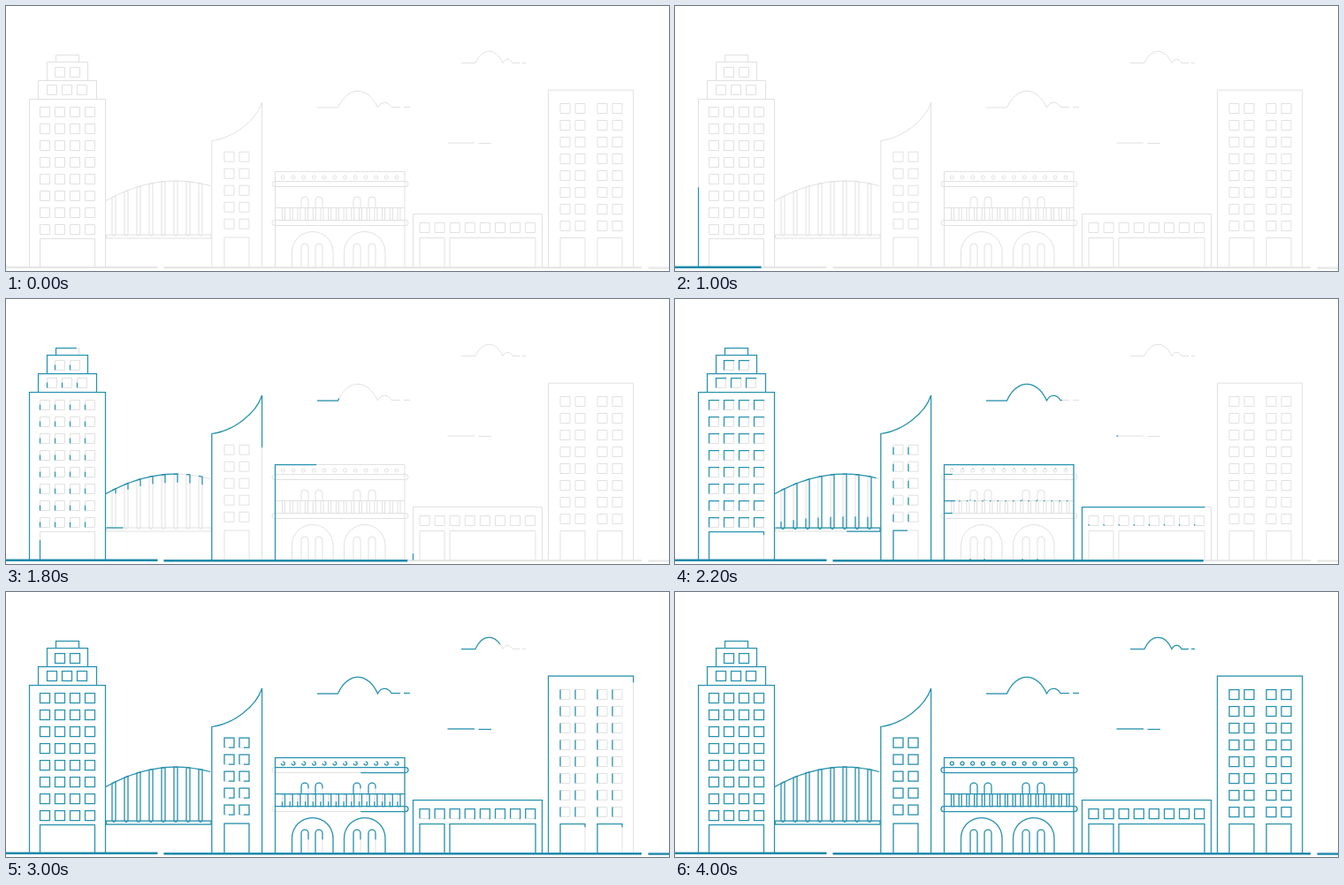
These frames come from a looping animation (750x300 px, 4.05 s). An HTML page:

```html
<!DOCTYPE html>
<html lang="en">
<head>
<meta charset="utf-8">
<title>Skyline</title>
<style>
  html, body { margin: 0; width: 100%; height: 100%; overflow: hidden; background: #fff; }
  svg { display: block; width: 750px; height: 300px; fill: none; }
  #base { stroke: #e1e1e1; }
  #ink { stroke: #2793b0; stroke-width: 1.25; }
  #base .ground { stroke: #e6e6e6; stroke-width: 2.2; }
  #ink .ground { stroke: #1f8aaa; stroke-width: 2.4; }
</style>
</head>
<body>
<svg viewBox="0 0 750 300"><g id="base"></g><g id="ink"></g></svg>
<script>
const LOOP = 4050, STEP = 50, FLOOR = 295.5;
const base = document.getElementById('base');
const ink = document.getElementById('ink');
const strokes = [];

const linear = u => u;
const easeIn = u => u ** 1.75;
const easeOut = u => 1 - (1 - u) ** 1.45;

function addPath(parent, d, cls) {
  const el = document.createElementNS('http://www.w3.org/2000/svg', 'path');
  el.setAttribute('d', d);
  el.setAttribute('class', cls);
  el.setAttribute('pathLength', 100);
  parent.append(el);
  return el;
}

// A pale path that is inked along its length between two times.
function draw(d, start, end, ease = linear, cls = '') {
  addPath(base, d, cls);
  strokes.push({ el: addPath(ink, d, cls), start, end, ease });
}

const range = (n, from, gap) => Array.from({ length: n }, (_, i) => from + i * gap);
const gate = (x, y, w, bottom = FLOOR) => `M${x} ${bottom}V${y}h${w}V${bottom}`;
const pane = (x, y) => `M${x} ${y + 11}v-11h11v11z`;
const arch = (x, top, w, bottom) =>
  `M${x} ${bottom}V${top + w / 2}a${w / 2} ${w / 2} 0 0 1 ${w} 0V${bottom}`;
// A puff of cloud, continuing from its left foot.
const puff = (x, y, w, h) =>
  `C${x + w * 0.11} ${y - h * 0.58} ${x + w * 0.29} ${y - h} ${x + w / 2} ${y - h}` +
  `S${x + w * 0.89} ${y - h * 0.58} ${x + w} ${y}`;

function panes(xs, ys, start, end) {
  for (const y of ys) for (const x of xs) draw(pane(x, y), start, end);
}

// Stepped tower
draw(gate(26.5, 105.5, 86), 550, 1700, easeIn);
draw(gate(36.5, 84.5, 66, 105), 1400, 1640);
draw(gate(46.5, 63.5, 46, 84), 1590, 1780);
draw(gate(56.5, 55.5, 26, 63), 1710, 1830);
panes(range(4, 38.5, 17), range(8, 114.5, 19), 1660, 2700);
panes(range(3, 46.5, 17), [89.5], 1660, 2700);
panes(range(2, 55.5, 17), [69.5], 1660, 2700);
draw(gate(38.5, 263.5, 62), 1680, 2350);

// Bridge
const bridgeY = x => 198 + 0.0036 * (x - 192) ** 2;
draw('M113 220.5Q172 186.9 231 203.5', 1150, 2300, easeOut);
draw('M113.5 259H232V263H113.5z', 1746, 2440);
for (const x of range(8, 120, 14)) {
  draw(`M${x} ${bridgeY(x)}L${x + 4} ${bridgeY(x + 4)}V259q-2 3 -4 0z`, 1720, 2480);
}

// Curved tower
draw(`M232.8 ${FLOOR}V152.5C256 150 283 130 289.6 109V${FLOOR}`, 1300, 2030);
panes([247, 264], range(5, 165.2, 19), 1980, 3130);
draw(gate(247, 262, 28), 1950, 2430);

// Arcade
draw(gate(304.5, 187.5, 146.5), 1510, 2190);
for (const y of [198.5, 242.5]) {
  draw(`M304 ${y}H452a3 3 0 0 1 0 6H304a3 3 0 0 1 0 -6z`, 2160, 3430);
}
for (const x of range(12, 313.3, 11.7)) {
  draw(`M${x} 192a2 2 0 0 1 0 4a2 2 0 0 1 0 -4z`, 2150, 3300);
}
draw('M304.5 228.5H451', 2140, 2850);
for (const x of range(16, 312.5, 8.7)) draw(`M${x} 228.5h3v14h-3z`, 2150, 3300);
for (const x of [334, 350, 393, 410]) {
  draw(arch(x, 216, 8, 228), 2170, 3200);
  draw(arch(x, 269, 8, FLOOR), 2170, 3300);
}
draw(arch(323.5, 255.5, 46.5, FLOOR), 2220, 2610);
draw(arch(382.5, 255.5, 46.5, FLOOR), 2290, 2800);

// Low building
draw(gate(460.5, 235.5, 146), 1785, 2340);
panes(range(8, 468, 17.1), [245.5], 2160, 3250);
draw(gate(468, 262.5, 28), 2200, 2590);
draw(gate(502, 262.5, 97), 2600, 2980);

// Right tower
draw(gate(613.5, 95.2, 96.2), 2480, 3330);
for (const x of [627, 669]) {
  panes([x, x + 17], range(8, 110.5, 19), 2680, 3960);
  draw(gate(x, 262.5, 28), 2490, 3230);
}

// Clouds
draw(`M352 115H375.5${puff(375.5, 115, 45, 18.7)}${puff(420.5, 114.5, 15.5, 5.2)}H446`, 1670, 2240);
draw('M450 114.5H457', 2250, 2350);
draw('M499.5 155H530', 2180, 2550);
draw('M534.5 155.5H549', 2620, 2850);
draw(`M515 64.5H531${puff(531, 64.5, 31, 13.2)}${puff(562, 64.5, 11, 4.2)}H581`, 2590, 3220);
draw('M584 64.5H588', 3250, 3350);

// Ground
draw('M0 295.8H171.5', 540, 1175, easeIn, 'ground');
draw('M178.5 296.2H719', 1190, 2760, easeOut, 'ground');
draw('M726.5 296.5H750', 2680, 2900, linear, 'ground');

const origin = performance.now();
function render(now) {
  const t = Math.floor((Math.max(0, now - origin) % LOOP) / STEP) * STEP;
  for (const { el, start, end, ease } of strokes) {
    const u = Math.min(1, Math.max(0, (t - start) / (end - start)));
    el.style.visibility = u > 0 ? 'visible' : 'hidden';
    el.style.strokeDasharray = u < 1 ? `${100 * ease(u)} 200` : 'none';
  }
  requestAnimationFrame(render);
}
render(origin);
</script>
</body>
</html>
```
